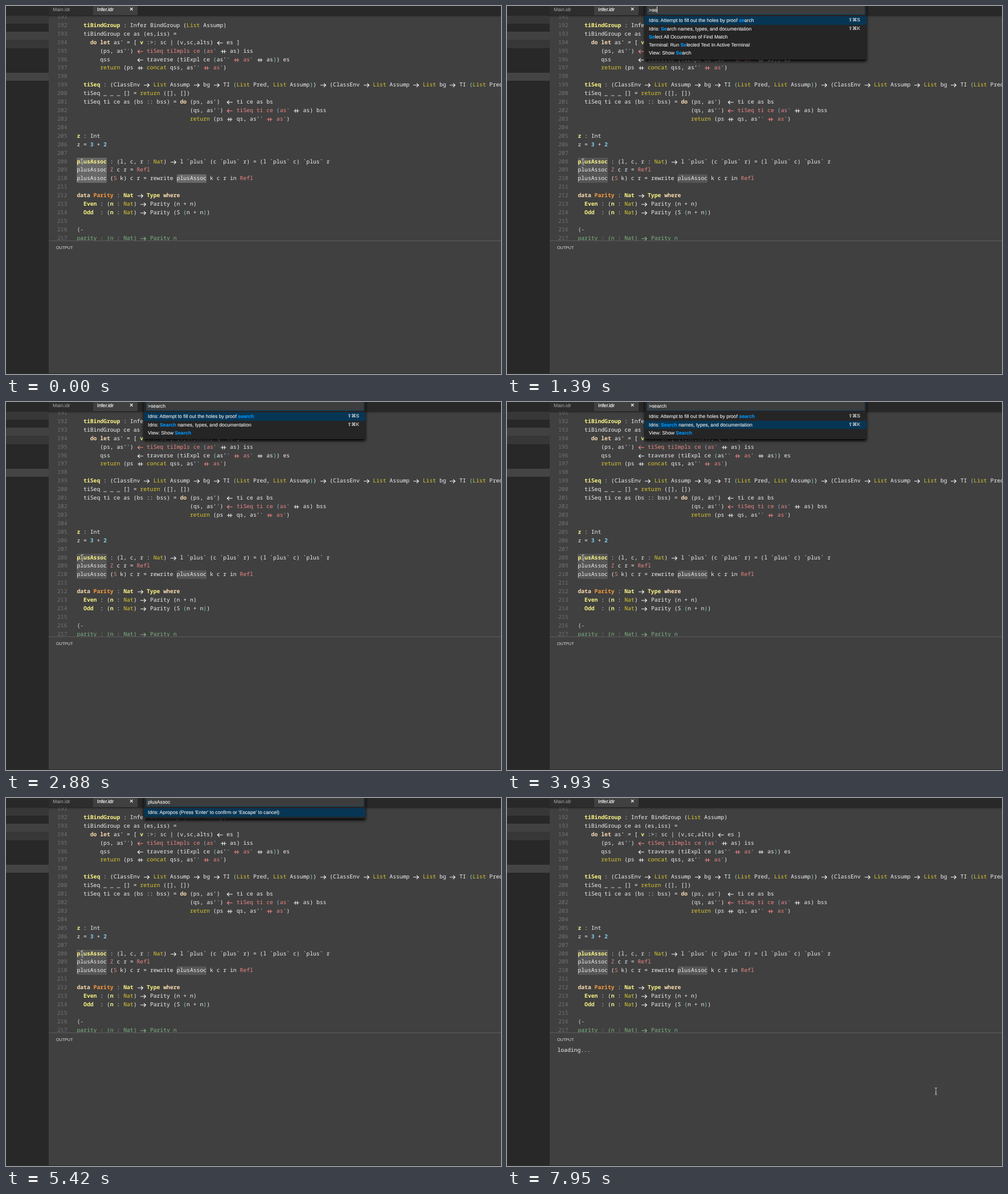
An HTML page for the animation above (8 s loop, 869 by 645 pixels).

```html
<!DOCTYPE html>
<html lang="en">
<head>
<meta charset="utf-8">
<title>Idris editor search</title>
<style>
html, body { margin: 0; width: 100%; height: 100%; overflow: hidden; background: #404040; }
#stage { position: relative; width: 869px; height: 645px; overflow: hidden; background: #404040;
  font: 8.65px/14.3px "Liberation Sans", Arial, sans-serif; color: #f0f0f0;
  text-rendering: geometricPrecision; white-space: pre; }
#stage div, #code span, #code svg, #mouse { position: absolute; }
#side { left: 0; top: 0; width: 75px; height: 645px; background: #282828; }
#side div { left: 0; width: 75px; height: 14.3px; }
#tabs { left: 75px; top: 0; width: 794px; height: 16px; background: #282828; }
#tabs div { top: 0; height: 16px; line-height: 12.6px; box-sizing: border-box; padding-left: 7px; }
#code { left: 75px; top: 16px; width: 794px; height: 395px; overflow: hidden; }
#shade { left: 75px; top: 16px; width: 794px; height: 5px; box-shadow: inset 0 4px 4px -4px #000; }
.mono { font: 9.733px/14.92px "Noto Sans Mono", "DejaVu Sans Mono", monospace; }
.line { left: 0; width: 100%; height: 14.92px; }
.line svg { width: 11.68px; height: 14.92px; fill: none; stroke: currentColor; stroke-width: 1.15; }
.hit { width: 52.6px; height: 14.92px; border-radius: 1.5px; background: #555; }
.lit .hit { background: #686868; }
.num { color: #717171; }
.y { color: #fbf485; font-weight: bold; }
.k { color: #fbdcb0; font-weight: bold; }
.b { font-weight: bold; }
.g { color: #dcc92f; }
.s { color: #ec8785; }
.q { color: #8fb0dc; }
.t { color: #7fd6c4; }
.n { color: #84d0ee; font-weight: bold; }
.o { color: #f99a3c; font-weight: bold; }
.c { color: #7fb483; }
.d { color: #c3d0c0; }
#panel { left: 75px; top: 411px; width: 794px; height: 233px; border-top: 1px solid #5c5c5c; box-sizing: border-box; }
#head { left: 13px; top: 5px; font-size: 7.15px; color: #e2e2e2; }
#load { left: 13.4px; top: 22.6px; }
#foot { left: 0; top: 644px; width: 869px; height: 1px; background: #2b2b2b; }
#menu { left: 242px; top: -6px; width: 389px; background: #252526; box-shadow: 0 3px 5px #000;
  -webkit-text-stroke: .12px currentColor; }
#field { left: 4px; top: 3px; width: 380px; height: 16px; border: 1px solid #174a69; background: #3d3d3d; }
#field span { position: absolute; left: 2px; top: 2px; line-height: 14px; }
#caret { display: inline-block; width: 1px; height: 11px; margin-right: -1px; background: #eee; vertical-align: -2px; }
.row { left: 0; width: 389px; height: 14.3px; }
.row.on { background: #073655; }
.row > span { position: absolute; left: 7px; }
.row > i { position: absolute; right: 11px; font: 8.2px/14.3px "Liberation Sans", "DejaVu Sans", sans-serif; }
.row b { color: #0097fb; }
#mouse { left: -3px; top: -6.5px; width: 6px; height: 13px; overflow: visible; fill: none; }
</style>
</head>
<body>
<div id="stage">
  <div id="side">
    <div style="top:17px;background:#373737"></div>
    <div style="top:45px;background:#414141"></div>
    <div style="top:59.3px;background:#373737"></div>
    <div style="top:117px;background:#444"></div>
  </div>
  <div id="tabs">
    <div style="left:0;width:78px;background:#2d2d2d;color:#a9a9a9">Main.idr</div>
    <div style="left:78px;width:78px;background:#404040;color:#fff;-webkit-text-stroke:.2px #fff">Infer.idr</div>
    <div style="left:135px;font-size:11px;font-weight:bold">×</div>
  </div>
  <div id="code" class="mono"></div>
  <div id="shade"></div>
  <div id="panel">
    <div id="head">OUTPUT</div>
    <div id="load" class="mono">loading...</div>
  </div>
  <div id="foot"></div>
  <div id="menu">
    <div id="field"><span><span id="query" style="position:static"></span><i id="caret"></i></span></div>
    <div id="rows" style="left:0;top:24.3px"></div>
  </div>
  <svg id="mouse" viewBox="0 0 6 13">
    <path id="beam" d="M.5 .5H1.8Q3 .5 3 1.8V11.2Q3 12.5 1.8 12.5H.5M5.5 .5H4.2Q3 .5 3 1.8M3 11.2Q3 12.5 4.2 12.5H5.5M1.8 8.5H4.2" stroke="#222" stroke-width="1.8"/>
    <use href="#beam" style="stroke:#eee"/>
    <path d="M.5 .5H1.8Q3 .5 3 1.8V11.2Q3 12.5 1.8 12.5H.5M5.5 .5H4.2Q3 .5 3 1.8M3 11.2Q3 12.5 4.2 12.5H5.5M1.8 8.5H4.2" stroke="#eee" stroke-width=".9"/>
  </svg>
</div>
<script>
const $ = id => document.getElementById(id);
const CELL = 5.84, LINE = 14.92, FIRST = 191, LEFT = 49.4;

// ~xText~ marks a coloured run of class x
const source = [
  "",
  "  ~ytiBindGroup~ : Infer BindGroup (~gList~ Assump)",
  "  tiBindGroup ce as (es,iss) =",
  "    ~kdo let~ as' = [ ~yv~ :>: sc | (v,sc,alts) <- es ]",
  "       (ps, as'~q'~) ~s<- tiSeq tiImpls ce ~~q(~~sas~~q'~ ++ as) iss",
  "       qss        <- traverse (tiExpl ce ~t(~as'~q'~~s ++ as~~q'~ ++ as~t)~) es",
  "       ~greturn~ (ps ++ ~gconcat~ qss, as'~q'~~s ++ as'~)",
  "",
  "  ~ytiSeq~ : (ClassEnv -> ~gList~ Assump -> bg -> TI ~t(~~gList~ Pred, ~gList~ Assump~t)~) -> (ClassEnv -> ~gList~ Assump -> ~gList~ bg -> TI ~t(~~gList~ Pred, ~gList~ Assump~t)~)",
  "  tiSeq _ _ _ [] = ~greturn~ ([], [])",
  "  tiSeq ti ce as (bs :: bss) = ~kdo~ (ps, as')  <- ti ce as bs",
  "                                  (qs, as'~q'~) ~s<- tiSeq ti ce ~~q(~~sas~~q'~ ++ as) bss",
  "                                  ~greturn~ (ps ++ qs, as'~q'~~s ++ as'~)",
  "",
  "~yz~ : Int",
  "z = ~n3~ + ~n2~",
  "",
  "~yplusAssoc~ : (l, c, r : ~gNat~) -> l `plus` (c `plus` r) = (l `plus` c) `plus` r",
  "plusAssoc ~sZ~ c r = ~sRefl~",
  "plusAssoc (~sS~ k) c r = rewrite plusAssoc k c r in ~sRefl~",
  "",
  "~kdata~ ~oParity~ : ~yNat~ -> ~yType~ ~kwhere~",
  "  ~yEven~ : (~yn~ : ~gNat~) -> Parity (n + n)",
  "  ~yOdd~  : (~yn~ : ~gNat~) -> Parity (S ~t(~n + n~t)~)",
  "",
  "~d{-~",
  "~cparity : (n : Nat) -> Parity n~"
];
const ligature = {
  "->": "M1 7.8H10.4M7 4.6L10.4 7.8L7 11",
  "<-": "M10.7 7.8H1.3M4.7 4.6L1.3 7.8L4.7 11",
  "++": "M1.2 7.8H10.5M4.1 4.8V10.8M7.6 4.8V10.8"
};

function add(parent, tag, cls, left, top) {
  const el = document.createElement(tag);
  el.className = cls;
  el.style.left = left + "px";
  el.style.top = top + "px";
  parent.append(el);
  return el;
}

function addLine(text, i) {
  const line = add($("code"), "div", "line", 0, i * LINE - 4.1);
  add(line, "span", "num", 15, 0).textContent = FIRST + i;
  let col = 0;
  text.split("~").forEach((run, j) => {
    const cls = j % 2 ? run[0] : "";
    const body = j % 2 ? run.slice(1) : run;
    for (const part of body.split(/(->|<-|\+\+| +)/)) {
      if (part.trim()) {
        const el = add(line, "span", cls, LEFT + col * CELL, 0);
        if (ligature[part]) el.innerHTML = `<svg viewBox="0 0 11.68 14.92"><path d="${ligature[part]}"/></svg>`;
        else el.textContent = part;
      }
      col += part.length;
    }
  });
}

[[208, 0], [209, 0], [210, 0], [210, 30]].forEach(([n, col]) =>
  add($("code"), "div", "hit", LEFT + col * CELL, (n - FIRST) * LINE - 4.1));
source.forEach(addLine);

const commands = [
  "Add Cursor Above|⌥⌘↑", "Add Cursor Below|⌥⌘↓", "Add Line Comment|⌘K ⌘C",
  "Add Selection To Next Find Match|⌘D", "Add Selection To Previous Find Match",
  "Change All Occurrences|⌘F2", "Change End of Line Sequence", "Change File Encoding",
  "Change Language Mode|⌘K M", "Clear Editor History",
  "Close Notification Messages|Escape, ⇧Escape", "Close Window|⌘W", "Configure Language",
  "Convert Indentation to Spaces", "Convert Indentation to Tabs", "Copy|⌘C", "Copy Line Down|⇧⌥↓"
];
const found = [
  "Idris: Attempt to fill out the holes by proof search|⇧⌘S",
  "Idris: Search names, types, and documentation|⇧⌘K", "View: Show Search"
];
const wide = [
  found[0], found[1], "Select All Occurences of Find Match",
  "Terminal: Run Selected Text In Active Terminal", found[2]
];
const prompt = ["Idris: Apropos (Press 'Enter' to confirm or 'Escape' to cancel)"];

// time, query, rows, caret, selected row
const steps = [
  [0, "", null],
  [140, ">", commands, 1, 0],
  [940, ">", commands, 0, 0],
  [1390, ">se", wide, 1, 0],
  [1540, ">sea", wide, 1, 0],
  [1690, ">sear", found, 1, 0],
  [1840, ">searc", found, 1, 0],
  [2280, ">search", found, 1, 0],
  [2880, ">search", found, 0, 0],
  [3330, ">search", found, 1, 1],
  [3930, ">search", found, 0, 1],
  [4230, "", prompt, 1, 0],
  [4670, "", prompt, 0, 0],
  [4820, "plusAssoc", prompt, 1, 0],
  [5420, "plusAssoc", prompt, 0, 0],
  [5560, "", null]
];

function mark(text, word) {
  if (!word) return text;
  const at = text.toLowerCase().indexOf(word);
  if (at < 0) return text.replace(/\bSe|\bA/g, "<b>$&</b>");
  const end = at + word.length;
  return text.slice(0, at) + "<b>" + text.slice(at, end) + "</b>" + text.slice(end);
}

function showMenu([, query, rows, caret, selected]) {
  $("menu").style.display = rows ? "block" : "none";
  if (!rows) return;
  const word = query[0] === ">" ? query.slice(1) : "";
  $("query").textContent = query;
  $("caret").style.visibility = caret ? "visible" : "hidden";
  $("menu").style.height = 28 + rows.length * 14.3 + "px";
  $("rows").innerHTML = rows.map((row, i) => {
    const [label, keys = ""] = row.split("|");
    return `<div class="row${i === selected ? " on" : ""}" style="top:${i * 14.3}px">` +
      `<span>${mark(label, word)}</span><i>${keys}</i></div>`;
  }).join("");
}

function moveMouse(t) {
  const k = t < 6900 ? 0 : Math.min(6, Math.floor((t - 6900) / 150) + 1);
  const u = k / 6, e = u * u * (3 - 2 * u);
  const [x, y] = t >= 7950 ? [753, 513.5] : [134 + 618 * e, 272.5 + 254 * e];
  $("mouse").style.transform = `translate(${x}px, ${y}px)`;
  $("mouse").style.visibility = t >= 7800 && t < 7950 ? "hidden" : "visible";
}

let shown = null;
const start = performance.now();
function draw() {
  const t = (performance.now() - start) % 8000;
  const step = steps.filter(s => s[0] <= t).pop();
  if (step !== shown) showMenu(shown = step);
  $("code").classList.toggle("lit", t < 140 || (t >= 5560 && t < 5710));
  $("load").style.visibility = t >= 6000 ? "visible" : "hidden";
  moveMouse(t);
  requestAnimationFrame(draw);
}
draw();
</script>
</body>
</html>
```
